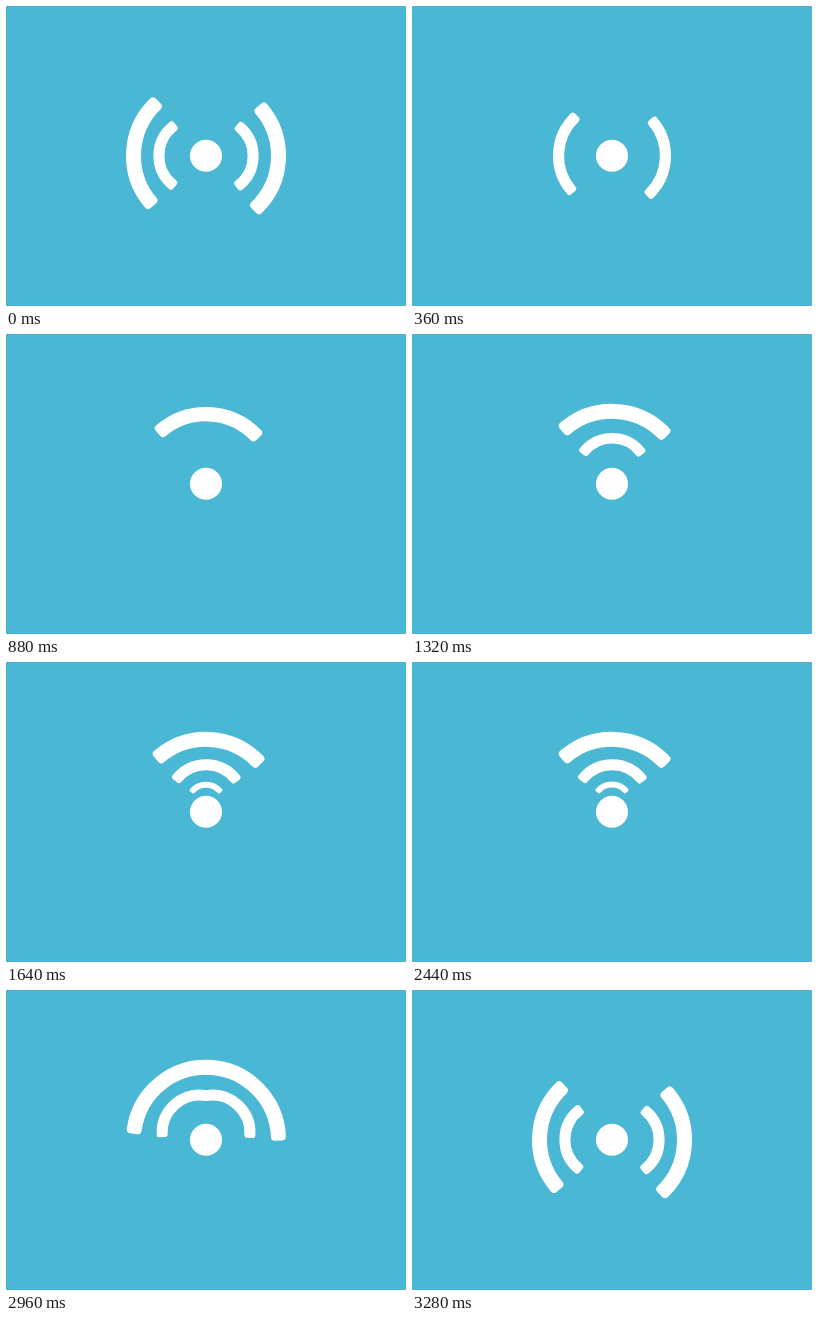
Animation, 400 px wide and 300 px high, one loop 5 s. Source, as an HTML page:

```html
<!DOCTYPE html>
<html lang="en">
<head>
<meta charset="utf-8">
<title>Signal</title>
<style>
  html, body { margin: 0; width: 100%; height: 100%; overflow: hidden; background: #4ab8d4; }
  svg { display: block; width: 100%; height: 100%; }
  path { fill: #fff; stroke: #fff; stroke-linejoin: round; }
</style>
</head>
<body>
<svg viewBox="0 0 400 300">
  <g id="icon" transform="translate(200 149.8)">
    <circle r="16" fill="#fff"/>
  </g>
</svg>
<script>
const LOOP = 5000;
const icon = document.getElementById('icon');

// Upward-facing band with rounded corners; rise lifts its circle above the pivot.
function band({ r, width, half, rise, corner }) {
  const path = document.createElementNS('http://www.w3.org/2000/svg', 'path');
  const a = half * Math.PI / 180 - corner / r;
  const out = r + width / 2 - corner;
  const inn = r - width / 2 + corner;
  const at = (rad, side) =>
    `${(side * rad * Math.sin(a)).toFixed(2)} ${(-rise - rad * Math.cos(a)).toFixed(2)}`;
  path.setAttribute('d',
    `M${at(out, -1)}A${out} ${out} 0 0 1 ${at(out, 1)}` +
    `L${at(inn, 1)}A${inn} ${inn} 0 0 0 ${at(inn, -1)}Z`);
  path.setAttribute('stroke-width', corner * 2);
  icon.append(path);
  return path;
}

const big = { r: 72.5, width: 15, half: 46.2, rise: 0, corner: 4 };
const mid = { r: 37.6, width: 11, half: 55.7, rise: 9.5, corner: 3 };
const tiny = { r: 18.4, width: 6, half: 54.6, rise: 9, corner: 1.8 };

const pairs = [
  { parts: [band(big), band(big)], tilt: 2.7, leave: [120, 590], enter: 570 },
  { parts: [band(mid), band(mid)], tilt: 0.5, leave: [0, 420], enter: 1003 }
];
const small = band(tiny);

const span = (t, from, to) => Math.min(1, Math.max(0, (t - from) / (to - from)));
const easeIn = p => p * p;
const easeOut = p => 1 - (1 - p) ** 3;
const easeInOut = p => p < 0.5 ? 4 * p ** 3 : 1 - 4 * (1 - p) ** 3;
const grow = (t, start) => easeOut(span(t, start, start + 471));

function place(path, angle, scale) {
  path.setAttribute('visibility', scale > 0.01 ? 'visible' : 'hidden');
  path.setAttribute('transform', `rotate(${angle}) scale(${scale})`);
}

function draw(t) {
  const open = easeInOut(span(t, 2610, 3330));
  for (const { parts, tilt, leave, enter } of pairs) {
    const leaving = t < leave[1];
    const turn = leaving ? 90 : 90 * open;
    const scale = leaving ? 1 - easeIn(span(t, ...leave)) : grow(t, enter);
    place(parts[0], tilt - turn, scale);
    place(parts[1], tilt + turn, turn ? scale : 0);
  }
  const shrink = span(t, 2420, 2760) ** 3;
  place(small, 0, grow(t, 1270) * (1 - shrink));
}

const begin = performance.now();
function tick() {
  draw((performance.now() - begin) % LOOP);
  requestAnimationFrame(tick);
}
tick();
</script>
</body>
</html>
```
